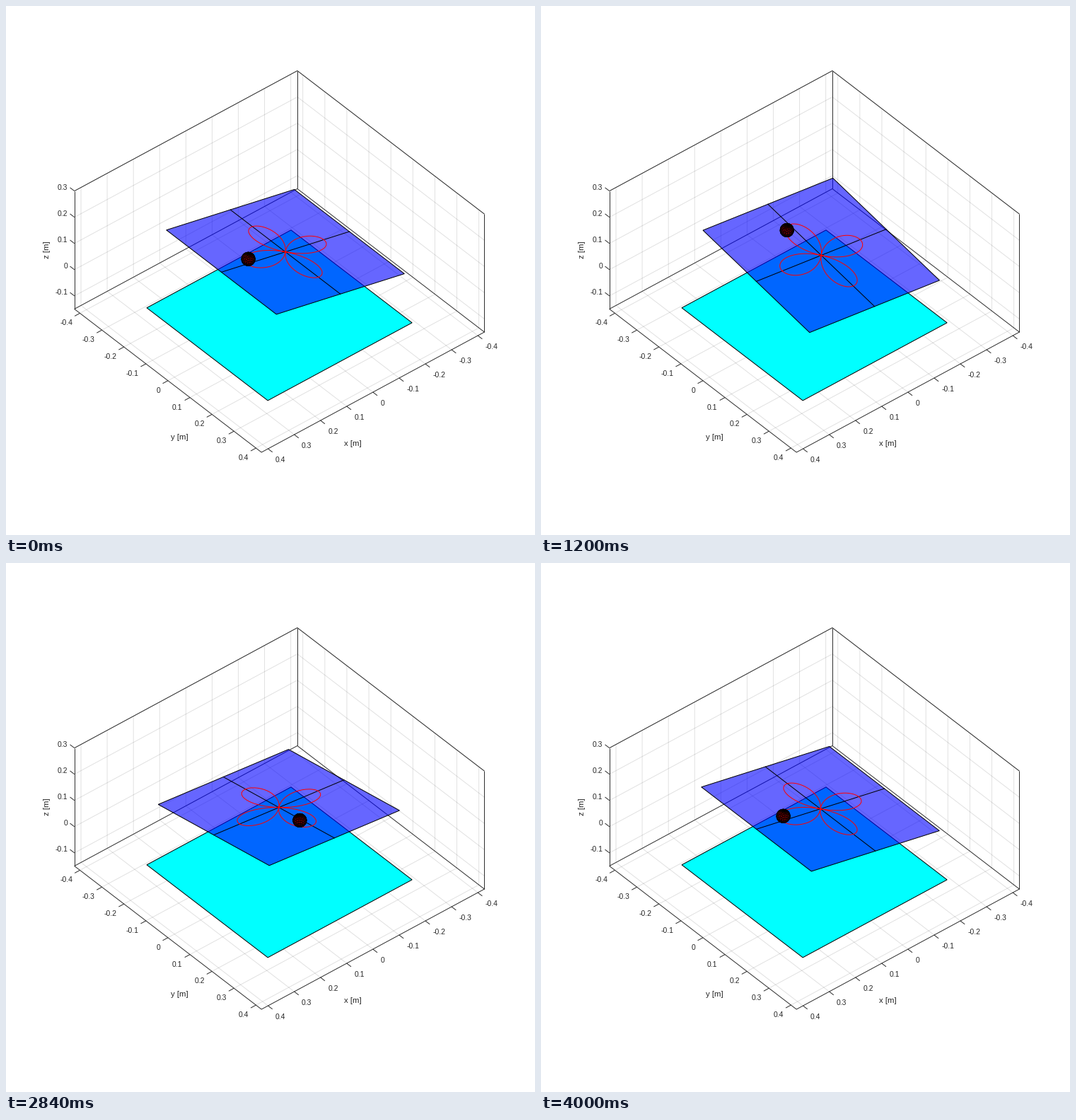
These frames come from a looping animation (748x748 px, 4.04 s). A matplotlib script:

```python
import numpy as np
import matplotlib.pyplot as plt
from matplotlib.animation import FuncAnimation
from matplotlib.collections import LineCollection, PolyCollection
from matplotlib.patches import Polygon

SIZE, DPI = 748, 100
STEPS, INTERVAL = 100, 40          # the loop holds both end points: 101 frames
PX = 72 / DPI                      # one pixel in points

LIM, Z0, Z1 = 0.425, -0.15, 0.3    # axes box
HALF, BASE, BASE_Z = 0.25, 0.275, -0.13
ARM, PIVOT_Z = 0.105, -0.003       # plate height above its pivot
ROSE, BALL = 0.15, 0.02
INK = (0.15, 0.15, 0.15)

# Orthographic camera, azimuth 140 and elevation 40 degrees
C, S = np.cos(np.radians(40)), np.sin(np.radians(40))
SCALE = 0.775 * SIZE / (2 * LIM * (C + S))
RIGHT = np.array([-C, S, 0])
UP = np.array([-S * S, -C * S, C])
TO_EYE = np.cross(RIGHT, UP)
VIEW = SCALE * np.array([RIGHT, -UP]).T
MID = np.array([0.5175 * SIZE - 0.5, 0.4825 * SIZE + 0.4 + 0.075 * SCALE * C])


def project(p):
    return np.asarray(p, float) @ VIEW + MID


def square(h, z=0.0):
    return np.array([(h, -h, z), (-h, -h, z), (-h, h, z), (h, h, z)])


def rose(theta, gain=1.0, lag=0.0):
    """Four-petal rose as a sum of two circular motions."""
    slow = theta - lag
    return ROSE / 2 * np.stack([np.cos(3 * theta) + gain * np.cos(slow),
                                np.sin(3 * theta) - gain * np.sin(slow),
                                0 * theta], -1)


def tilt(theta):
    """Plate attitude that keeps the ball on its path."""
    sb = -(0.182 * np.cos(3 * theta) + 0.035 * np.cos(theta))
    sa = 0.178 * np.sin(3 * theta) - 0.031 * np.sin(theta)
    cb, ca = np.sqrt(1 - sb * sb), np.sqrt(1 - sa * sa)
    ry = np.array([(cb, 0, sb), (0, 1, 0), (-sb, 0, cb)])
    rx = np.array([(1, 0, 0), (0, ca, -sa), (0, sa, ca)])
    return ry @ rx


plt.rcParams["font.family"] = "Liberation Sans"
fig = plt.figure(figsize=(SIZE / DPI, SIZE / DPI), dpi=DPI, facecolor="white")
ax = fig.add_axes([0, 0, 1, 1])
ax.set_xlim(0, SIZE)
ax.set_ylim(SIZE, 0)
ax.axis("off")


def add_lines(segments, color, width, z):
    ax.add_collection(LineCollection([project(s) for s in segments], colors=[color],
                                     linewidths=width * PX, zorder=z))


def label(x, y, text, size, **kw):
    ax.text(x, y, text, fontsize=size * PX, color=INK, va="baseline", **kw)


def draw_axes():
    L = LIM
    ticks = np.arange(-4, 5) / 10
    zticks = np.arange(-1, 4) / 10
    grid, marks = [], []
    for t in ticks:
        grid.append([(t, L, Z0), (t, -L, Z0), (t, -L, Z1)])
        grid.append([(L, t, Z0), (-L, t, Z0), (-L, t, Z1)])
        marks.append([(t, L, Z0), (t, L + 0.02, Z0)])
        marks.append([(L, t, Z0), (L + 0.02, t, Z0)])
        x, y = project((t, L, Z0))
        label(x + 10.5, y + 19, f"{t:g}", 10.4, ha="left")
        x, y = project((L, t, Z0))
        label(x - 10.5, y + 17, f"{t:g}", 10.4, ha="right")
    for t in zticks:
        grid.append([(L, -L, t), (-L, -L, t), (-L, L, t)])
        marks.append([(L, -L, t), (L, -L - 0.02, t)])
        x, y = project((L, -L, t))
        label(x - 9.5, y - 2, f"{t:g}", 10.4, ha="right")
    floor = square(L, Z0)
    box = [[*floor, floor[0]],
           [(L, -L, Z1), (-L, -L, Z1), (-L, L, Z1)]]
    box += [[(x, y, Z0), (x, y, Z1)] for x, y in ((L, -L), (-L, -L), (-L, L))]
    add_lines(grid, (*INK, 0.15), 0.9, 1)
    add_lines(box + marks, INK, 0.95, 2)
    label(490.5, 622, "x [m]", 11.4, ha="center")
    label(245.5, 613, "y [m]", 11.4, ha="center")
    label(61.5, 345, "z [m]", 11.4, ha="center", rotation=90, rotation_mode="anchor")


draw_axes()
thin = dict(lw=1.0 * PX)
ax.add_patch(Polygon(project(square(BASE, BASE_Z)), fc="cyan", ec="black", zorder=3, **thin))
plate = ax.add_patch(Polygon(project(square(HALF)), fc=(0, 0, 1, 0.6), ec=(0, 0, 0, 1),
                             zorder=4, **thin))
cross = [ax.plot([], [], color="black", zorder=5, **thin)[0] for _ in range(2)]
petals, = ax.plot([], [], color="red", zorder=6, **thin)
ball = PolyCollection([], facecolors="red", edgecolors="black", linewidths=0.8 * PX, zorder=7)
ax.add_collection(ball)

PLATE = square(HALF)
ARMS = HALF * np.array([[(-1, 0, 0), (1, 0, 0)], [(0, -1, 0), (0, 1, 0)]])
CURVE = rose(np.linspace(0, 2 * np.pi, 241))


def sphere_faces(n=20):
    lon, lat = np.meshgrid(np.linspace(-np.pi, np.pi, n + 1),
                           np.linspace(-np.pi / 2, np.pi / 2, n + 1))
    p = np.stack([np.cos(lat) * np.cos(lon), np.cos(lat) * np.sin(lon), np.sin(lat)], -1)
    quads = np.stack([p[:-1, :-1], p[:-1, 1:], p[1:, 1:], p[1:, :-1]], 2)
    return quads.reshape(-1, 4, 3)


FACES = sphere_faces()


def update(i):
    theta = 2 * np.pi * i / STEPS
    rot = tilt(theta)

    def place(p):
        return project((p + (0, 0, ARM)) @ rot.T + (0, 0, PIVOT_Z))

    plate.set_xy(place(PLATE))
    for line, arm in zip(cross, ARMS):
        line.set_data(*place(arm).T)
    petals.set_data(*place(CURVE).T)

    # The ball trails the drawn curve slightly
    facing = (FACES @ rot.T).mean(axis=1) @ TO_EYE > 0
    centre = rose(np.array(theta), gain=1.03, lag=0.042) + (0, 0, BALL)
    ball.set_verts(place(FACES[facing] * BALL + centre))
    return [plate, *cross, petals, ball]


anim = FuncAnimation(fig, update, frames=STEPS + 1, interval=INTERVAL,
                     repeat=True, repeat_delay=0, blit=False)
plt.show()
```
